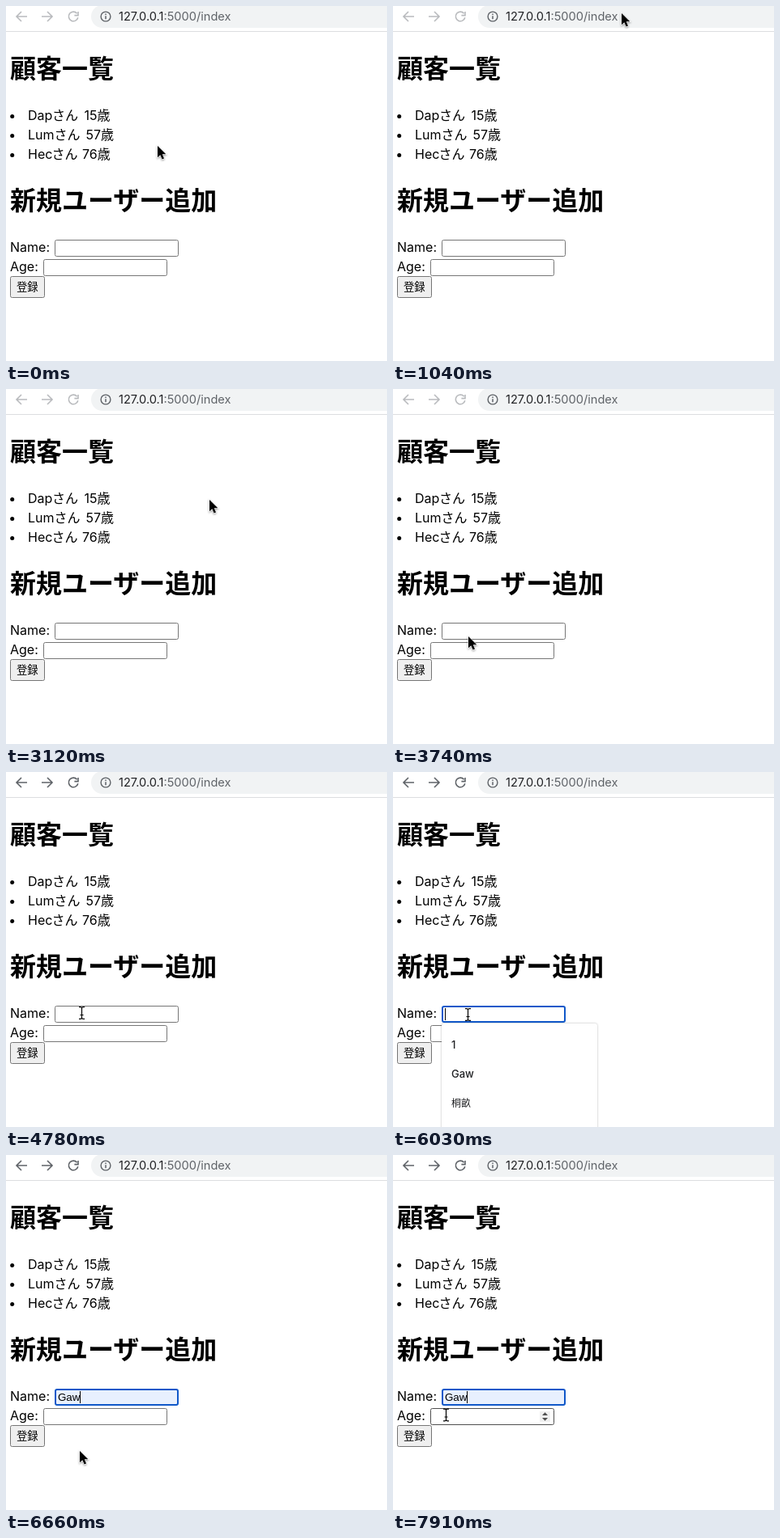
Recreate the animation shown at these times as an HTML page. Size 470 by 439 pixels, loop 8000 ms.

```html
<!DOCTYPE html>
<html lang="ja">
<head>
<meta charset="utf-8">
<title>顧客一覧</title>
<style>
  html, body { margin: 0; width: 100%; height: 100%; overflow: hidden; background: #fff; }
  svg { display: block; width: 470px; height: 439px; }
  text { font: 16px Inter, "Noto Sans CJK JP", sans-serif; fill: #000; white-space: pre; }
  .head { font: 700 32px "Noto Sans CJK JP", sans-serif; }
  .url { font: 14.6px Inter, sans-serif; fill: #202124; }
  .url .rest { fill: #5f6368; }
  .small { font: 13.333px "Liberation Sans", "Noto Sans CJK JP", sans-serif; }
  .option { font: 500 13px Inter, "Noto Sans CJK JP", sans-serif; fill: #202124; }
  .option:lang(ja) { font-size: 12px; }
  .field { fill: #fff; stroke: #767676; }
  #nav { fill: none; stroke-width: 1.6; }
  #menu { filter: drop-shadow(0 0 1px rgba(0,0,0,.3)); }
  #arrow { filter: drop-shadow(0 1px 1px rgba(0,0,0,.4)); }
</style>
</head>
<body>
<svg viewBox="0 0 470 439">
  <g id="toolbar">
    <rect y="31" width="470" height="1" fill="#dcdee0"/>
    <rect x="105" y="-1" width="400" height="28" rx="14" fill="#f1f3f4"/>
    <g id="nav">
      <path d="M26 13H13.5M19 7L13 13L19 19"/>
      <path d="M44 13H56.5M51 7L57 13L51 19"/>
      <path d="M87.6 9.2A5.8 5.8 0 1 0 88.8 14.2"/>
      <path d="M89 7V11.6H84.4"/>
    </g>
    <circle cx="123" cy="13" r="5.9" fill="none" stroke="#5f6368" stroke-width="1.4"/>
    <path d="M123 12.2V16.2M123 9.6V11" stroke="#5f6368" stroke-width="1.5"/>
    <text class="url" x="139" y="18">127.0.0.1<tspan class="rest">:5000/index</tspan></text>
  </g>

  <text class="head" x="5" y="89">顧客一覧</text>
  <g id="customers"></g>
  <text class="head" x="5" y="252">新規ユーザー追加</text>

  <text x="5" y="304">Name:</text>
  <rect id="name" class="field" rx="2"/>
  <text id="value" class="small" x="64" y="304"></text>
  <rect id="caret" y="292" width="1" height="15"/>

  <text x="5" y="328">Age:</text>
  <rect id="age" class="field" x="46.5" y="313.5" width="152" height="20" rx="2"/>
  <g id="spinner">
    <rect x="181" y="317" width="13" height="13" fill="#efefef"/>
    <path d="M184 322L187.5 318.2L191 322ZM184 325L187.5 328.8L191 325Z" fill="#505050"/>
  </g>

  <rect x="5.5" y="334.5" width="42" height="26" rx="2" fill="#efefef" stroke="#767676"/>
  <text class="small" x="13" y="352">登録</text>

  <g id="menu">
    <rect x="60" y="311" width="192" height="150" rx="3" fill="#fff"/>
    <rect id="highlight" x="60" width="192" height="36" fill="#eeeeee"/>
    <g id="options"></g>
  </g>

  <path id="arrow" d="M0 0V14.2L3.3 11.2L5.6 16.6L8 15.6L5.8 10.3H10.3Z"
        stroke="#fff" stroke-width="1.3" paint-order="stroke"/>
  <path id="beam" fill="none" stroke="#000" stroke-width="1.2"
        d="M-3.5 -7.4H-1.5Q0 -7.2 0 -5.8Q0 -7.2 1.5 -7.4H3.5M0 -6V6M-3.5 7.4H-1.5Q0 7.2 0 5.8Q0 7.2 1.5 7.4H3.5M-2 2.5H2"/>
</svg>
<script>
const LOOP = 8000;
const $ = id => document.getElementById(id);

const customers = [["Dap", 57, 96.5, 15], ["Lum", 59.5, 98.5, 57], ["Hec", 56.5, 94, 76]];
$("customers").innerHTML = customers.map(([name, suffixX, ageX, age], i) => {
  const y = 141 + 24 * i;
  return `<circle cx="7.7" cy="${y - 4.5}" r="2.5"/>
    <text x="27" y="${y}">${name}<tspan x="${suffixX}">さん</tspan><tspan x="${ageX}">${age}歳</tspan></text>`;
}).join("");

const options = [["1", "en"], ["Gaw", "en"], ["桐畝", "ja"]];
$("options").innerHTML = options.map(([label, lang], i) =>
  `<text class="option" lang="${lang}" x="72" y="${342 + 36 * i}">${label}</text>`).join("");

// Pointer steps: time, x, y, shape
const pointer = [
  [0, 187, 173, "arrow"],
  [210, 212, 142, "arrow"], [420, 256, 84, "arrow"], [620, 284, 44, "arrow"],
  [830, 290, 22, "arrow"], [1040, 282, 9, "arrow"], [1250, 270, 3, "arrow"],
  [1450, 255, 1, "arrow"], [1660, 239, 6, "arrow"], [1870, 233, 14, "arrow"],
  [2080, 243, 31, "arrow"], [2290, 264, 51, "arrow"], [2490, 276, 63, "arrow"],
  [3120, 251, 137, "arrow"], [3330, 185, 222, "arrow"], [3540, 118, 288, "arrow"],
  [3740, 93, 306, "arrow"],
  [4780, 93.5, 298, "beam"], [5820, 92.5, 300, "beam"],
  [6240, 92, 340, "arrow"], [6450, 91, 366, "arrow"],
  [7080, 88, 360, "arrow"], [7290, 78, 346, "arrow"],
  [7490, 69, 328, "beam"], [7700, 66, 323, "beam"], [7910, 65.5, 321.5, "beam"]
];

// Form steps: time, changed properties
const form = [
  [0, { active: false, focus: false, open: false, caret: false, pick: -1 }],
  [4160, { active: true }],
  [4990, { focus: true, open: true, caret: true }],
  [5410, { caret: false }],
  [5820, { caret: true }],
  [6240, { pick: 0, caret: false }],
  [6450, { pick: 1 }],
  [6660, { open: false, caret: true }],
  [7080, { caret: false }],
  [7490, { caret: true }]
];

const show = (id, on) => $(id).setAttribute("visibility", on ? "visible" : "hidden");
const set = (id, attrs) => {
  for (const key in attrs) $(id).setAttribute(key, attrs[key]);
};

function render(t) {
  const [, x, y, shape] = pointer.filter(step => step[0] <= t).pop();
  const s = Object.assign({}, ...form.filter(step => step[0] <= t).map(step => step[1]));
  const filled = s.pick >= 0;
  const overAge = shape === "beam" && y >= 313;

  for (const id of ["arrow", "beam"]) {
    show(id, id === shape);
    set(id, { transform: `translate(${x} ${y})` });
  }
  set("nav", { stroke: s.active ? "#5f6368" : "#b9bbbe" });

  set("name", s.focus
    ? { x: 61, y: 290, width: 151, height: 19 }
    : { x: 60.5, y: 289.5, width: 152, height: 20 });
  $("name").style.cssText = s.focus
    ? `stroke:#1058c9;stroke-width:2;fill:${filled ? "#e8f0fe" : "#fff"}`
    : "";
  $("value").textContent = filled ? options[s.pick][0] : "";
  show("caret", s.caret);
  set("caret", { x: filled ? 91 : 64 });

  $("age").style.stroke = overAge ? "#4f4f4f" : "#767676";
  show("spinner", overAge);

  show("menu", s.open);
  show("highlight", s.open && filled);
  set("highlight", { y: 319 + 36 * s.pick });
}

const start = performance.now();
function tick() {
  render((performance.now() - start) % LOOP);
  requestAnimationFrame(tick);
}
tick();
</script>
</body>
</html>
```
